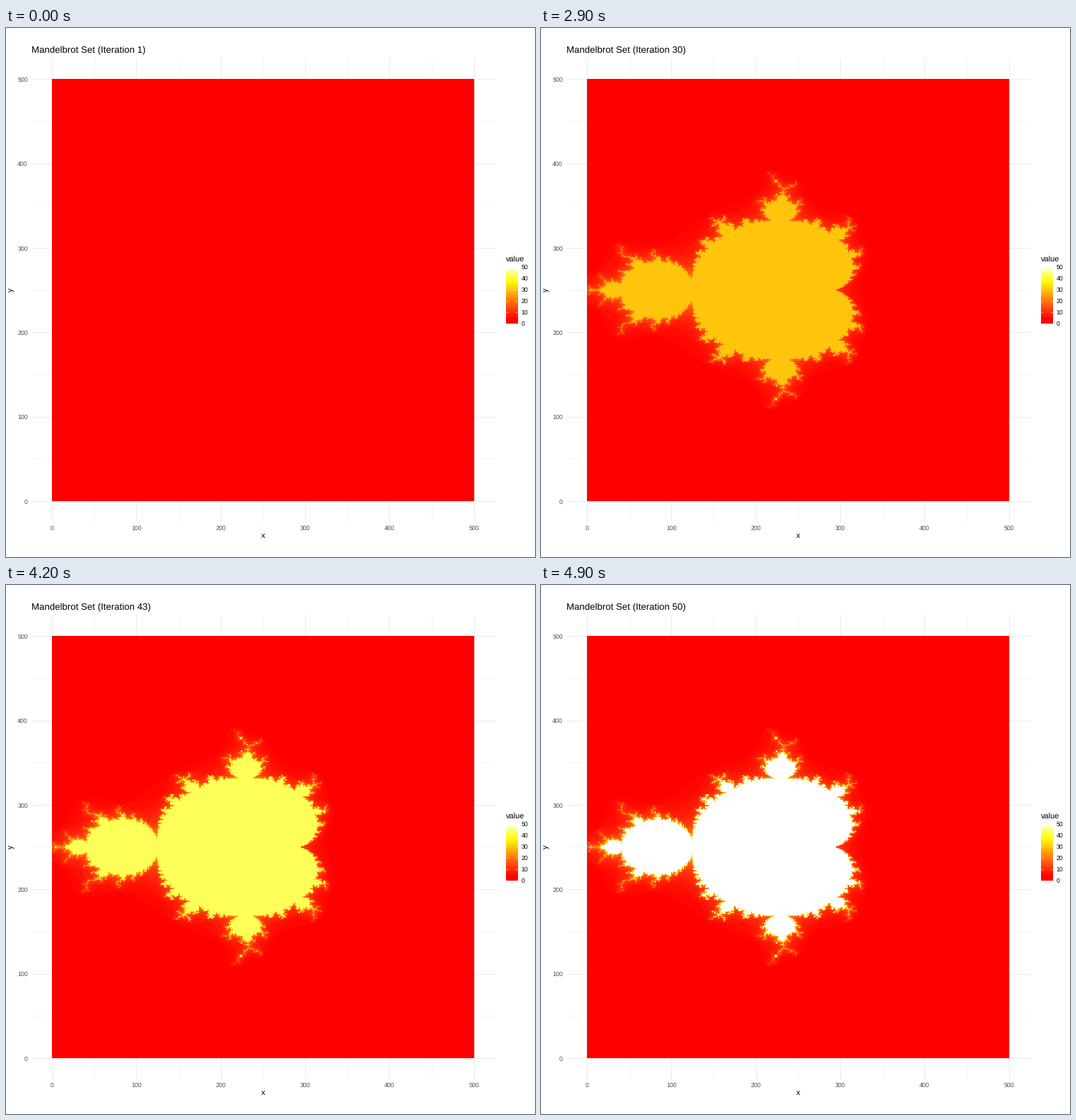
A matplotlib script for the animation above (5000 ms loop, 748 by 748 pixels).

```python
import numpy as np
import matplotlib.pyplot as plt
from matplotlib.animation import FuncAnimation

SIZE, DPI = 748, 72
STEPS = 50
CELLS = 500
SCALE = 1.1934            # pixels per data unit
ORIGIN_X, ORIGIN_Y = 64.9, 669.1

plt.rcParams.update({
    "font.family": "Liberation Sans",
    "text.hinting": "none",
    "toolbar": "None",
})


def px(x):
    return ORIGIN_X + SCALE * x


def py(y):
    return ORIGIN_Y - SCALE * y


def heat(value):
    """Red through orange and yellow to white, for values 0 to 50."""
    green = np.interp(value, [4, 23, 34, 38], [0, 140, 230, 255])
    blue = np.interp(value, [4, 12, 37, 41, 45, 48, 50],
                     [0, 12, 14, 50, 130, 204, 255])
    return np.stack([np.full_like(green, 255), green, blue], -1).astype(np.uint8)


def escape_counts():
    re = np.linspace(-1.5, 1.5, CELLS)
    im = np.linspace(2, -2, CELLS)
    c = re[None, :] + 1j * im[:, None]
    z = np.zeros_like(c)
    counts = np.zeros(c.shape, int)
    alive = np.ones(c.shape, bool)
    for step in range(1, STEPS + 1):
        z[alive] = z[alive] ** 2 + c[alive]
        alive &= np.abs(z) <= 2
        counts[alive] = step
    return counts


fig = plt.figure(figsize=(SIZE / DPI, SIZE / DPI), dpi=DPI, facecolor="white")
ax = fig.add_axes([0, 0, 1, 1])
ax.axis("off")


def label(x, y, text, size, color="black", **kw):
    return ax.text(x, y, text, fontsize=size, color=color, **kw)


# Panel grid
low, high = -24.5, 525.5
for value in range(0, 501, 50):
    width = 1.07 if value % 100 == 0 else 0.53
    style = dict(color="#EBEBEB", lw=width, solid_capstyle="butt", zorder=1)
    ax.plot([px(value)] * 2, [py(low), py(high)], **style)
    ax.plot([px(low), px(high)], [py(value)] * 2, **style)

# Axis text
for value in range(0, 501, 100):
    label(px(value), 710.3, str(value), 8.8, "#4D4D4D", ha="center")
    label(30.8, py(value) + 3.5, str(value), 8.8, "#4D4D4D", ha="right")
label(363.8, 721, "x", 11, ha="center")
label(13, 370.5, "y", 11, rotation=90, ha="right", va="center")
title = label(35.6, 35, "", 13.2)

# Legend
BAR = (707, 723.5, 417.8, 337.8)
label(707, 331, "value", 11)
ramp = heat(np.linspace(STEPS, 0, 300))[:, None, :]
ax.imshow(ramp, extent=BAR, aspect="auto", interpolation="nearest", zorder=2)
for value in range(0, STEPS + 1, 10):
    y = BAR[2] + (BAR[3] - BAR[2]) * value / STEPS
    label(728.6, y + 3.2, str(value), 8.8)
    for x in (BAR[0], BAR[1] - 3.3):
        ax.plot([x, x + 3.3], [y, y], color="white", lw=0.5,
                solid_capstyle="butt", zorder=3)

# Raster
counts = escape_counts()
palette = heat(np.arange(STEPS + 1.0))
raster = ax.imshow(palette[np.minimum(counts, 1)],
                   extent=(px(0.5), px(500.5), py(0.5), py(500.5)),
                   aspect="auto", interpolation="nearest", zorder=2)
ax.set_xlim(0, SIZE)
ax.set_ylim(SIZE, 0)


def update(frame):
    step = frame + 1
    title.set_text(f"Mandelbrot Set (Iteration {step})")
    raster.set_data(palette[np.minimum(counts, step)])
    return title, raster


anim = FuncAnimation(fig, update, frames=STEPS, interval=100,
                     repeat=True, repeat_delay=0)
plt.show()
```
